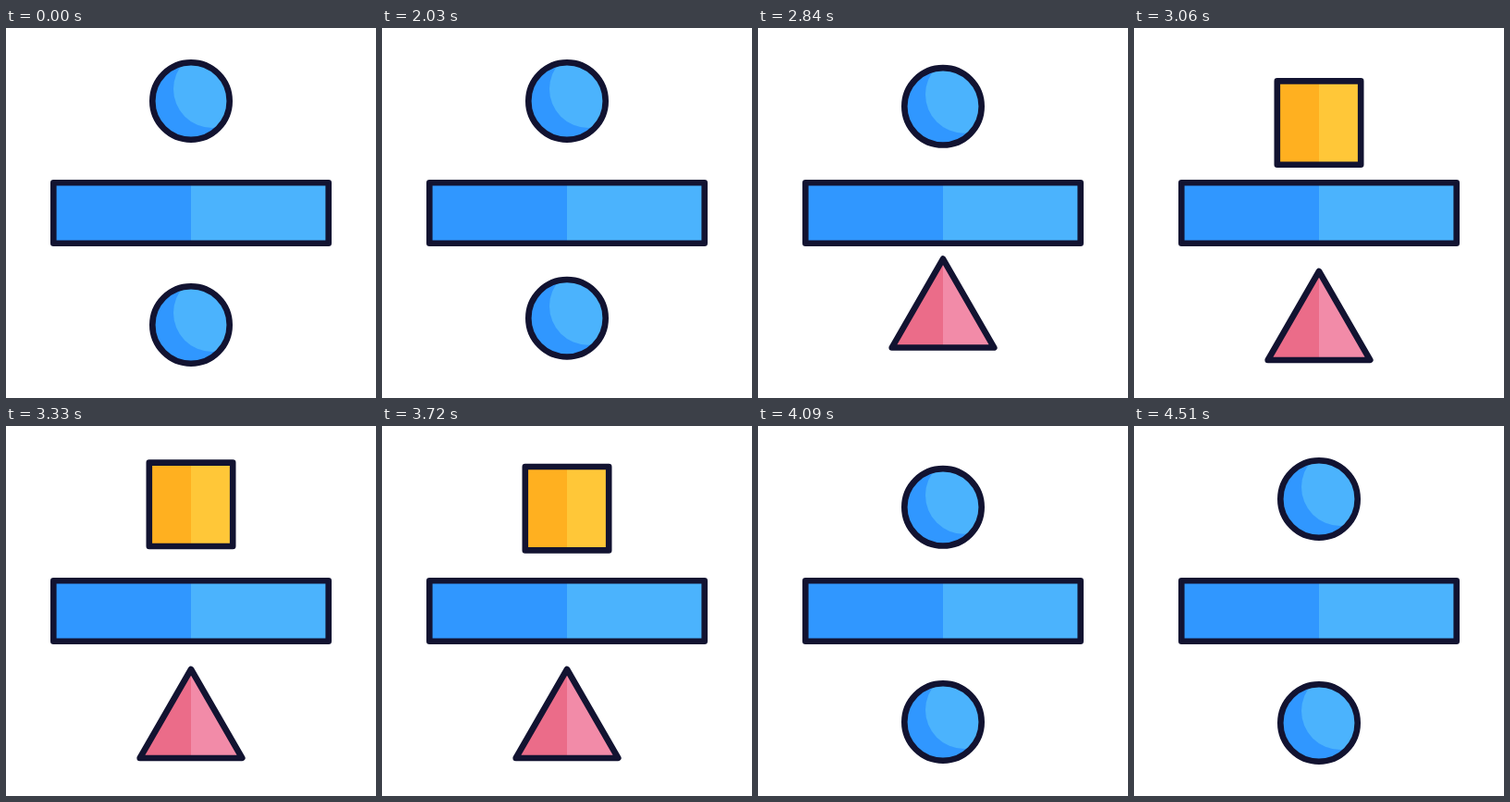
Animation, 400 px wide and 400 px high, one loop 4540 ms. Source, as an HTML page with a canvas:

```html
<!DOCTYPE html>
<html lang="en">
<head>
<meta charset="utf-8">
<title>Divide</title>
<style>
  html, body { margin: 0; width: 100%; height: 100%; overflow: hidden; background: #fff; }
  canvas { display: block; width: 400px; height: 400px; }
</style>
</head>
<body>
<canvas id="stage"></canvas>
<script>
const LOOP = 4540;
const INK = '#121331';
const BLUE = ['#3097ff', '#4bb3fd'];
const PINK = ['#eb6c89', '#f28ba8'];
const GOLD = ['#ffb020', '#ffc738'];

const canvas = document.getElementById('stage');
const ctx = canvas.getContext('2d');
const dpr = window.devicePixelRatio || 1;
canvas.width = canvas.height = 400 * dpr;

const ease = {
  line: u => u,
  in: u => u * u,
  out: u => Math.sin(u * Math.PI / 2),
  soft: u => (1 - Math.cos(u * Math.PI)) / 2
};

// Each act: start time, shape, keys of [time, centre y, easing into the key].
const TOP = [
  [0, circle, [[2780, 79], [2940, 119, 'in']]],
  [2940, square, [[2940, 116], [3060, 103, 'in'], [3180, 73.5, 'out'],
    [3300, 84, 'soft'], [3420, 86, 'out'], [3550, 86],
    [3640, 77, 'soft'], [3720, 88.8, 'in'], [3830, 115.5, 'out']]],
  [3830, circle, [[3830, 119], [4090, 88, 'soft'], [4220, 76, 'out'], [4500, 79, 'soft']]]
];
const BOTTOM = [
  [0, circle, [[2029, 321], [2030, 314, 'line'], [2165, 282, 'line']]],
  [2165, diamond, [[2165, 300], [2300, 326, 'out'], [2420, 308.8, 'soft'], [2600, 312, 'soft']].concat(
    [[2725, 312], [2820, 300, 'line']])],
  [2820, triangle, [[2820, 298], [2950, 336, 'out'], [3060, 321, 'soft'],
    [3720, 321], [3810, 298, 'in']]],
  [3810, circle, [[3810, 282], [3960, 335, 'out'], [4090, 320, 'soft'], [4200, 321, 'soft']]]
];

function valueAt(keys, t) {
  if (t <= keys[0][0]) return keys[0][1];
  for (let i = 1; i < keys.length; i++) {
    const [t0, y0] = keys[i - 1];
    const [t1, y1, kind] = keys[i];
    if (t < t1) return y0 + (y1 - y0) * ease[kind || 'line']((t - t0) / (t1 - t0));
  }
  return keys[keys.length - 1][1];
}

function outline(path) {
  ctx.strokeStyle = INK;
  ctx.lineWidth = 6.6;
  ctx.lineJoin = 'round';
  ctx.stroke(path);
}

// Fills a closed polygon in two tones, split at x = 200.
function split(points, [dark, light]) {
  const path = new Path2D();
  points.forEach(([x, y]) => path.lineTo(x, y));
  path.closePath();
  ctx.fillStyle = dark;
  ctx.fill(path);
  ctx.save();
  ctx.clip(path);
  ctx.fillStyle = light;
  ctx.fillRect(200, 0, 200, 400);
  ctx.restore();
  outline(path);
}

function box(halfW, halfH, y, tones) {
  split([[200 - halfW, y - halfH], [200 + halfW, y - halfH],
    [200 + halfW, y + halfH], [200 - halfW, y + halfH]], tones);
}

function circle(y) {
  const path = new Path2D();
  path.arc(200, y, 41.7, 0, Math.PI * 2);
  ctx.fillStyle = BLUE[0];
  ctx.fill(path);
  ctx.save();
  ctx.clip(path);
  ctx.fillStyle = BLUE[1];
  ctx.beginPath();
  ctx.arc(223, y - 13, 42, 0, Math.PI * 2);
  ctx.fill();
  ctx.restore();
  outline(path);
}

function square(y) {
  box(45.2, 45.2, y, GOLD);
}

function diamond(y) {
  const r = 59.5;
  split([[200, y - r], [200 + r, y], [200, y + r], [200 - r, y]], PINK);
}

function triangle(y) {
  split([[200, y - 58], [255.3, y + 38], [144.7, y + 38]], PINK);
}

function play(acts, t) {
  const [, shape, keys] = acts.filter(act => t >= act[0]).pop();
  shape(valueAt(keys, t));
}

function draw(t) {
  ctx.setTransform(dpr, 0, 0, dpr, 0, 0);
  ctx.fillStyle = '#fff';
  ctx.fillRect(0, 0, 400, 400);
  play(TOP, t);
  play(BOTTOM, t);
  box(148.7, 32.7, 200, BLUE);
}

const start = performance.now();
function frame() {
  draw((performance.now() - start) % LOOP);
  requestAnimationFrame(frame);
}
frame();
</script>
</body>
</html>
```
